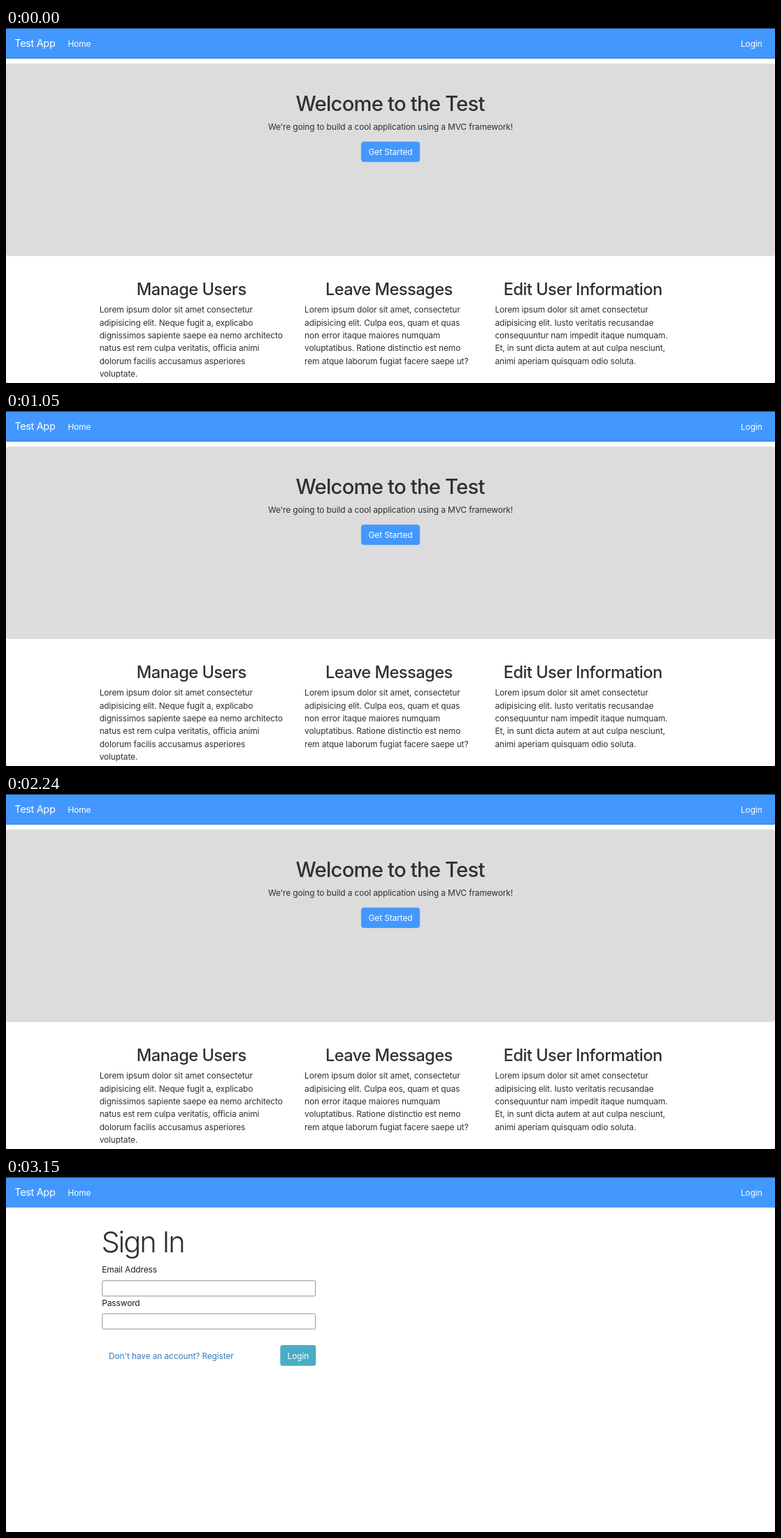
An HTML page for the animation above (3.5 s loop, 1100 by 509 pixels).

```html
<!DOCTYPE html>
<html lang="en">
<head>
<meta charset="utf-8">
<title>Test App</title>
<style>
  html, body { margin: 0; width: 100%; height: 100%; overflow: hidden; background: #fff; }
  svg { display: block; width: 100vw; height: 100vh; }
  text {
    font: 400 11.9px Inter, sans-serif;
    font-optical-sizing: none;
    letter-spacing: -.1px;
    fill: #303030;
    white-space: pre;
  }
  .mid { text-anchor: middle; }
  .light { fill: #fff; }
  .brand { font-size: 14.5px; letter-spacing: -.35px; }
  .hero { font-size: 29.2px; font-weight: 500; letter-spacing: -.0265em; }
  .heading { font-size: 23.6px; font-weight: 500; letter-spacing: -.022em; }
  .display { font-size: 41.5px; font-weight: 340; letter-spacing: -2px; }
  .label { fill: #1c1c1c; }
  .link { fill: #357cba; }
  .input { fill: #fff; stroke: #929292; }
</style>
</head>
<body>
<svg viewBox="0 0 1100 509">
  <rect width="1100" height="509" fill="#fff"/>
  <rect width="1100" height="43.8" fill="#4298ff"/>
  <rect width="1100" height="1" fill="#15325c"/>
  <text class="brand light" x="12.3" y="27.4">Test App</text>
  <text class="light" x="88.4" y="26.8">Home</text>
  <text class="light" x="1051" y="26.8">Login</text>

  <g id="home">
    <rect y="42.8" width="1100" height="1" fill="#3d7cc6"/>
    <rect y="51" width="1100" height="276" rx="4" fill="#dcdcdc"/>
    <text class="hero mid" x="549.6" y="119">Welcome to the Test</text>
    <text class="mid" x="550" y="146">We're going to build a cool application using a MVC framework!</text>
    <rect x="508.3" y="163.3" width="83.4" height="28.4" rx="3.5" fill="#4298ff" stroke="#3c88e2" stroke-width=".6"/>
    <text class="light mid" x="550" y="181.8">Get Started</text>
  </g>

  <g id="signIn">
    <text class="display" x="136.4" y="108">Sign In</text>
    <text class="label" x="137.3" y="137.3">Email Address</text>
    <rect class="input" x="137.8" y="148.7" width="304.8" height="22" rx="1.5"/>
    <text class="label" x="137.3" y="184.8">Password</text>
    <rect class="input" x="137.8" y="196" width="304.8" height="22" rx="1.5"/>
    <text class="link" x="147.1" y="260.5">Don't have an account? Register</text>
    <rect x="392.3" y="241" width="51" height="29.7" rx="3.5" fill="#49adc5"/>
    <text class="light mid" x="417.9" y="260.5">Login</text>
  </g>

  <path d="M0 507.5V509H1.5ZM1100 507.5V509H1098.5Z" fill="#777"/>
</svg>
<script>
  const LOOP = 3500, SIGN_IN_AT = 2310;
  const home = document.getElementById('home');
  const signIn = document.getElementById('signIn');

  const columns = [
    { title: 'Manage Users', center: 265.2, left: 133.7, lines: [
      'Lorem ipsum dolor sit amet consectetur',
      'adipisicing elit. Neque fugit a, explicabo',
      'dignissimos sapiente saepe ea nemo architecto',
      'natus est rem culpa veritatis, officia animi',
      'dolorum facilis accusamus asperiores',
      'voluptate.'] },
    { title: 'Leave Messages', center: 547.8, left: 427.1, lines: [
      'Lorem ipsum dolor sit amet, consectetur',
      'adipisicing elit. Culpa eos, quam et quas',
      'non error itaque maiores numquam',
      'voluptatibus. Ratione distinctio est nemo',
      'rem atque laborum fugiat facere saepe ut?'] },
    { title: 'Edit User Information', center: 825.2, left: 699.4, lines: [
      'Lorem ipsum dolor sit amet consectetur',
      'adipisicing elit. Iusto veritatis recusandae',
      'consequuntur nam impedit itaque numquam.',
      'Et, in sunt dicta autem at aut culpa nesciunt,',
      'animi aperiam quisquam odio soluta.'] }
  ];

  function addText(content, x, y, className = '') {
    const text = document.createElementNS(home.namespaceURI, 'text');
    text.setAttribute('x', x);
    text.setAttribute('y', y);
    text.setAttribute('class', className);
    text.textContent = content;
    home.append(text);
  }

  for (const { title, center, left, lines } of columns) {
    addText(title, center, 383, 'heading mid');
    lines.forEach((line, i) => addText(line, left, 408.3 + i * 18.35));
  }

  function draw() {
    const signingIn = performance.now() % LOOP >= SIGN_IN_AT;
    home.style.display = signingIn ? 'none' : '';
    signIn.style.display = signingIn ? '' : 'none';
    requestAnimationFrame(draw);
  }
  draw();
</script>
</body>
</html>
```
